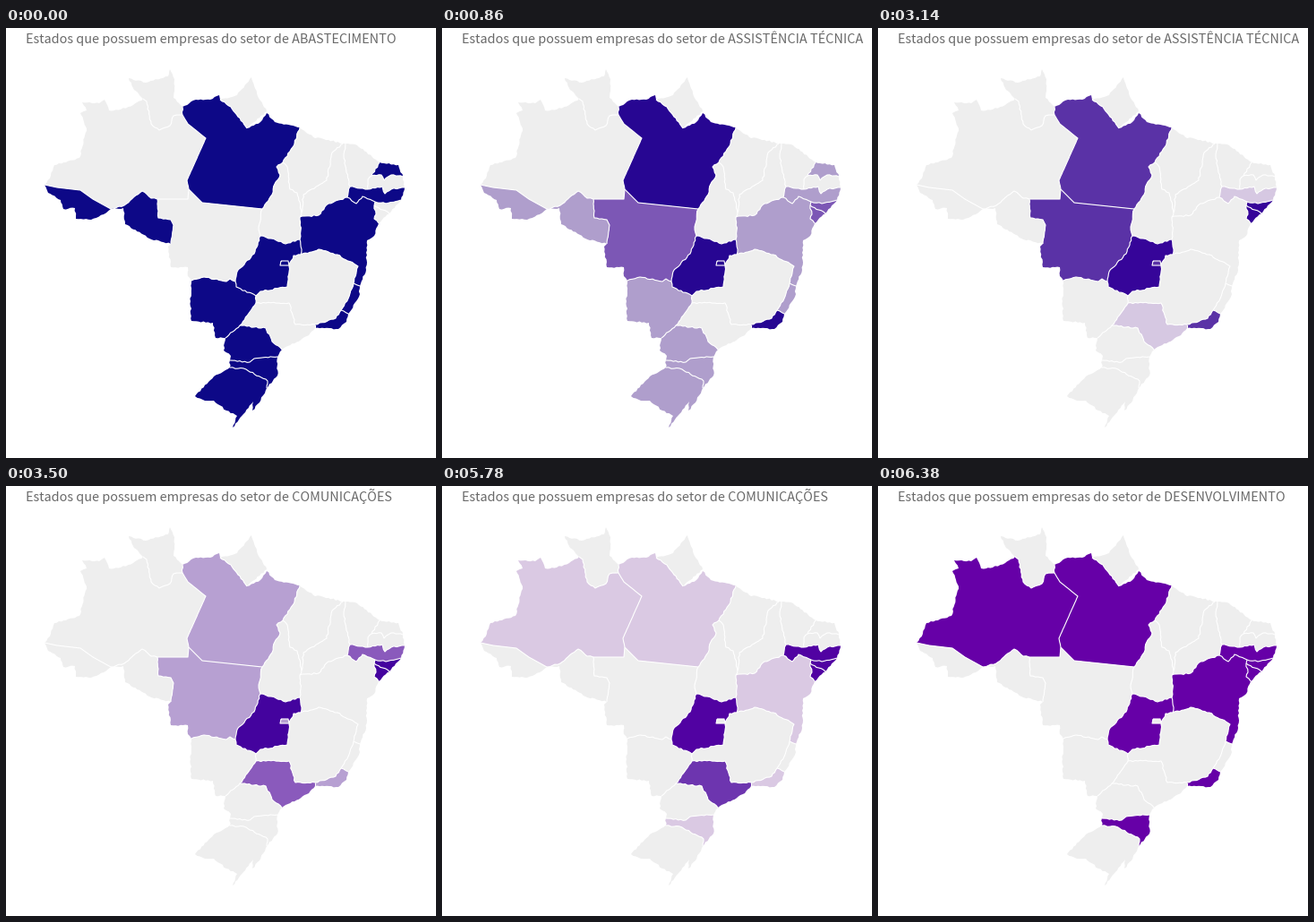
These frames come from a looping animation (480x480 px, 8000 ms). A matplotlib script:

```python
import numpy as np
import matplotlib.pyplot as plt
from matplotlib.animation import FuncAnimation
from matplotlib.collections import LineCollection, PolyCollection
from matplotlib.colors import to_rgb

SIZE, DPI, STEP_MS, LOOP_MS = 480, 100, 20, 8000
STARTS, STEPS, HOLD = (500, 3140, 5780), 6, 120
PX = 72 / DPI

# Sector title, fill colour, states with companies
SECTORS = [
    ("ABASTECIMENTO", "#0d0887", "PA AC RO RN PE BA GO DF ES RJ MS PR SC RS"),
    ("ASSISTÊNCIA TÉCNICA", "#310597", "PA MT GO DF RJ SE AL"),
    ("COMUNICAÇÕES", "#4c02a1", "GO PE AL SE SP"),
    ("DESENVOLVIMENTO", "#6600a7", "AM PA GO PE AL SE BA RJ SC"),
]
GREY = "#eeeeee"

rng = np.random.default_rng(4)
edges, inner = {}, []
pen = np.zeros(2)


def rough(pts, amp):
    """Split long segments and nudge the new points sideways."""
    out = [pts[0]]
    for a, b in zip(pts[:-1], pts[1:]):
        d = b - a
        length = np.hypot(*d)
        normal = np.array([-d[1], d[0]]) / length
        for u in np.arange(1, length // 2.6) / (length // 2.6):
            out.append(a + d * u + normal * rng.uniform(-amp, amp))
        out.append(b)
    return np.array(out)


def start(x, y):
    global pen
    pen = np.array([x, y], float)


def edge(states, *xy, amp=0.8):
    """Walk on through key points: a coast (one state) or a border (two)."""
    global pen
    pts = np.vstack([pen, np.reshape(xy, (-1, 2))])
    pen = pts[-1]
    line = rough(pts, amp)
    for s in states.split():
        edges.setdefault(s, []).append(line)
    if " " in states or s == "DF":
        inner.append(line)


def outline(lines):
    """Chain edges end to end into one closed polygon."""
    rest = list(lines)
    ring = rest.pop(0)
    while rest:
        i = next(i for i, e in enumerate(rest)
                 if any(np.allclose(p, ring[-1]) for p in (e[0], e[-1])))
        e = rest.pop(i)
        ring = np.vstack([ring, e if np.allclose(e[0], ring[-1]) else e[::-1]])
    return ring


# Outer contour, clockwise from the far west
start(43, 175)
edge("AM", 50, 165, 54, 153, 82, 145, 90, 112, 83, 95, 90, 92, 85, 83, 104, 84, 110, 80,
     115, 92, 128, 91, 142, 86, 153, 79)
edge("RR", 143, 69, 137, 56, 156, 61, 181, 54, 183, 46, 188, 57, 187, 78, 197, 88)
edge("PA", 212, 80, 228, 80, 238, 75, 239, 80)
edge("AP", 258, 75, 274, 55, 280, 73, 291, 93, 269, 112)
edge("PA", 284, 105, 291, 95, 300, 105, 328, 111)
edge("MA", 345, 123, 352, 123, 376, 129)
edge("PI", 379, 129)
edge("CE", 392, 131, 417, 150)
edge("RN", 438, 153, 443, 166)
edge("PB", 445, 178)
edge("PE", 441, 192)
edge("AL", 428, 207)
edge("SE", 416, 218)
edge("BA", 411, 232, 403, 237, 402, 270, 395, 288)
edge("ES", 394, 300, 382, 319)
edge("RJ", 380, 328, 371, 336, 345, 335)
edge("SP", 338, 343, 308, 359)
edge("PR", 303, 367)
edge("SC", 303, 388, 291, 402)
edge("RS", 283, 418, 275, 427, 276, 417, 265, 431, 253, 446, 258, 433, 246, 427, 232, 416,
     222, 416, 211, 411, 232, 389, 250, 379)
edge("SC", 250, 371)
edge("PR", 251, 366, 243, 360, 245, 346)
edge("MS", 234, 346, 231, 329, 207, 327, 206, 305, 207, 282)
edge("MT", 203, 277, 203, 267, 184, 267, 181, 244, 184, 241)
edge("RO", 160, 235, 133, 219, 131, 201, 117, 202)
edge("AC", 109, 208, 95, 214, 78, 213, 77, 201, 64, 202, 61, 192, 47, 184, 43, 175)

# Northern borders
edge("AM AC", 57, 178, 83, 181, 97, 191, 117, 202, amp=0)
edge("AM RO", 132, 198, 152, 182, 162, 190, 169, 191)
edge("AM MT", 203, 191, 204, 180, amp=0)
edge("PA MT", 219, 195, 286, 202, amp=0)
edge("PA TO", 297, 186, 300, 174, 306, 164, 302, 155, 309, 150)
edge("PA MA", 320, 133, 328, 111)
start(204, 180)
edge("AM PA", 202, 170, 223, 123, 203, 107, 197, 97, amp=0.1)
edge("PA RR", 197, 88)
start(197, 97)
edge("AM RR", 187, 98, 183, 109, 171, 114, 162, 107, 157, 82, 153, 79)
start(239, 80)
edge("AP PA", 251, 88, 269, 112)
start(184, 241)
edge("RO MT", 187, 220, 184, 214, 170, 212, 169, 191, amp=0.4)

# North-eastern borders
start(309, 150)
edge("MA TO", 314, 155, 317, 180, 325, 184, 330, 206)
edge("MA PI", 332, 186, 358, 170, 364, 139, 376, 129)
start(330, 206)
edge("PI TO", 328, 211)
edge("BA TO", 329, 226, 328, 236)
edge("GO TO", 312, 241, 296, 235, 284, 232)
edge("MT TO", 282, 222, 286, 202)
start(379, 129)
edge("CE PI", 377, 143, 384, 177)
edge("CE PE", 404, 180)
edge("CE PB", 404, 169, 408, 165)
edge("CE RN", 417, 150)
start(384, 177)
edge("PE PI", 381, 189)
edge("BA PI", 360, 196, 349, 209, 328, 211)
start(381, 189)
edge("PE BA", 391, 196, 398, 188, 412, 194)
edge("AL BA", 411, 198)
edge("SE BA", 413, 208, 411, 213, 416, 218)
start(443, 166)
edge("RN PB", 430, 164, 422, 170, 419, 164, 408, 165)
start(445, 178)
edge("PB PE", 430, 180, 423, 185, 420, 177, 404, 180)
start(441, 192)
edge("AL PE", 424, 196, 412, 194)
start(428, 207)
edge("AL SE", 411, 198)

# Central and southern borders
start(395, 288)
edge("BA ES", 388, 285)
edge("BA MG", 393, 266, 370, 253, 349, 247, 329, 253)
edge("BA GO", 330, 247, 328, 236)
start(388, 285)
edge("ES MG", 382, 302, 374, 315)
edge("RJ MG", 368, 324, 345, 331)
edge("SP MG", 323, 331, 316, 307, 290, 307, 279, 307)
edge("MS MG", 279, 299)
edge("GO MG", 284, 294, 314, 289, 316, 266, 321, 254, 329, 253)
start(279, 299)
edge("GO MS", 257, 289, 256, 283)
edge("GO MT", 258, 272, 277, 252, 284, 232)
start(256, 283)
edge("MT MS", 250, 280, 246, 283, 221, 278, 207, 282)
start(374, 315)
edge("ES RJ", 382, 319)
start(345, 331)
edge("SP RJ", 345, 335)
start(279, 307)
edge("MS SP", 261, 332)
edge("PR SP", 290, 335, 297, 350, 308, 359)
start(261, 332)
edge("PR MS", 245, 346)
start(303, 367)
edge("PR SC", 277, 369, 272, 373, 250, 371)
start(291, 402)
edge("SC RS", 292, 394, 268, 381, 250, 379)
start(307, 260)
edge("DF", 315, 260, 316, 265, 306, 265, 307, 260, amp=0)

# Colours are blended in CIELAB
TO_XYZ = np.array([[0.4124, 0.3576, 0.1805], [0.2126, 0.7152, 0.0722],
                   [0.0193, 0.1192, 0.9505]])
WHITE = TO_XYZ.sum(axis=1)


def to_lab(color):
    c = np.array(to_rgb(color))
    lin = np.where(c > 0.04045, ((c + 0.055) / 1.055) ** 2.4, c / 12.92)
    v = TO_XYZ @ lin / WHITE
    x, y, z = np.where(v > 0.008856, np.cbrt(v), 7.787 * v + 16 / 116)
    return np.array([116 * y - 16, 500 * (x - y), 200 * (y - z)])


def from_lab(lab):
    y = (lab[0] + 16) / 116
    f = np.array([y + lab[1] / 500, y, y - lab[2] / 200])
    v = np.where(f > 0.2069, f ** 3, (f - 16 / 116) / 7.787)
    lin = np.clip(np.linalg.solve(TO_XYZ, v * WHITE), 0, 1)
    return np.where(lin > 0.0031308, 1.055 * lin ** (1 / 2.4) - 0.055, 12.92 * lin)


def blend(a, b, p):
    return from_lab((1 - p) * to_lab(a) + p * to_lab(b))


def progress(t):
    """Sector being left and the share of the way to the next one."""
    i = max(sum(t >= s for s in STARTS) - 1, 0)
    step = np.clip((t - STARTS[i]) // HOLD + 1, 0, STEPS)
    return i, step / STEPS


states = sorted(edges, key=lambda s: s == "DF")
fig = plt.figure(figsize=(SIZE / DPI, SIZE / DPI), dpi=DPI, facecolor="white")
ax = fig.add_axes([0, 0, 1, 1])
ax.set(xlim=(0, SIZE), ylim=(SIZE, 0))
ax.axis("off")
shapes = PolyCollection([outline(edges[s]) for s in states], linewidths=0)
ax.add_collection(shapes, autolim=False)
ax.add_collection(LineCollection(inner, colors="white", linewidths=1.1 * PX), autolim=False)
title = ax.text(21.5, 17, "", fontsize=14.4 * PX, color="#6a6a6a",
                family=["Noto Sans CJK JP", "DejaVu Sans"])


def update(frame):
    i, p = progress(frame * STEP_MS)
    old, new = SECTORS[i:i + 2]

    def fill(state):
        a, b = (c if state in members.split() else GREY for _, c, members in (old, new))
        return (a, b)

    pairs = [fill(s) for s in states]
    mixed = {ab: blend(*ab, p) for ab in set(pairs)}
    shapes.set_facecolor([mixed[ab] for ab in pairs])
    sector = new[0] if p > 0.5 else old[0]
    title.set_text("Estados que possuem empresas do setor de " + sector)
    return shapes, title


anim = FuncAnimation(fig, update, frames=LOOP_MS // STEP_MS, interval=STEP_MS,
                     repeat=True, repeat_delay=0)
plt.show()
```
